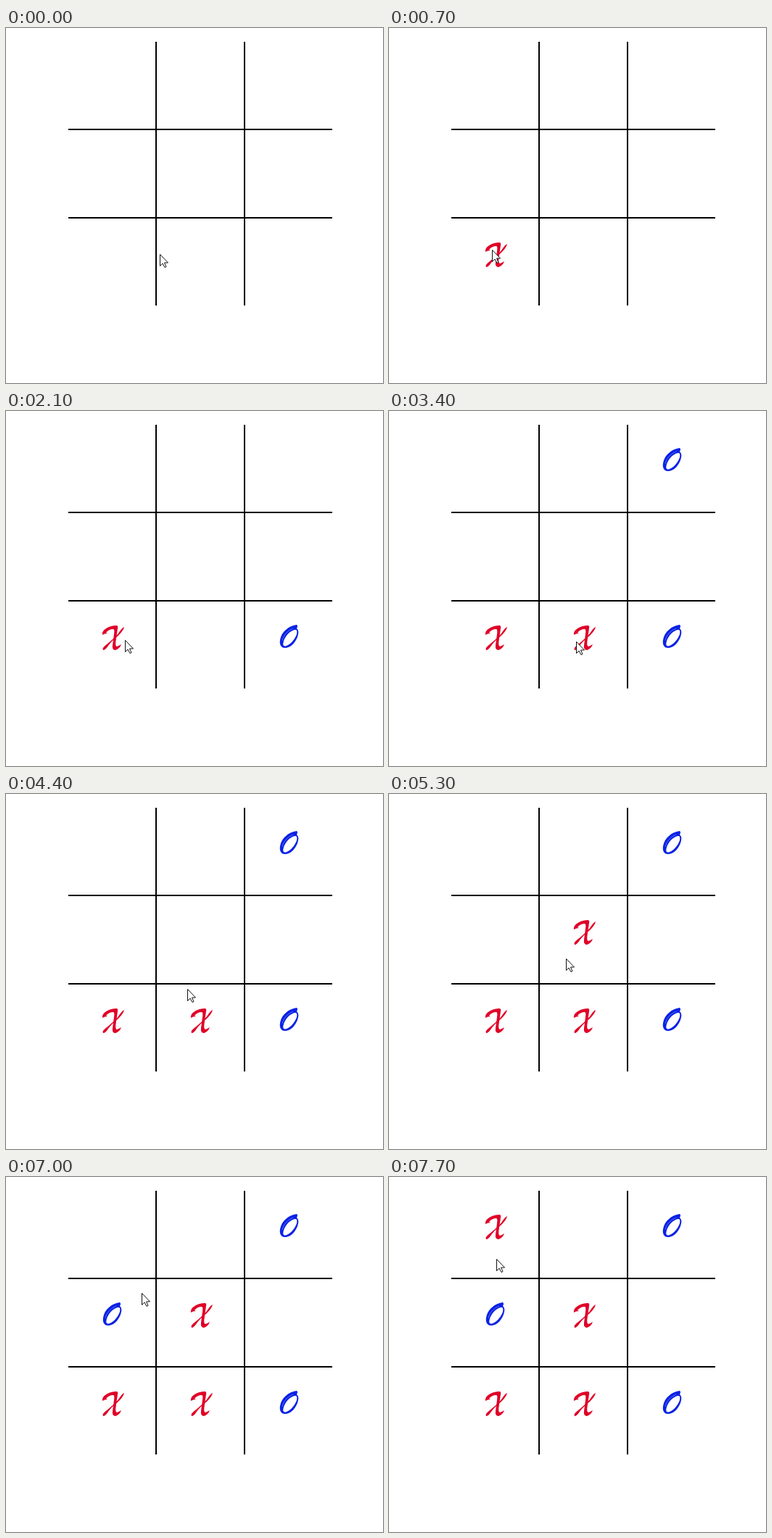
Animation, 520 px wide and 490 px high, one loop 8 s. Source, as an HTML page:

```html
<!DOCTYPE html>
<html lang="en">
<head>
<meta charset="utf-8">
<title>Tic-tac-toe</title>
<style>
  html, body { margin: 0; width: 100%; height: 100%; overflow: hidden; background: #fff; }
  svg { display: block; }
</style>
</head>
<body>
<svg width="520" height="490" viewBox="0 0 520 490">
  <defs>
    <g id="x" fill="#e00028">
      <path d="M1 13C0 7 7 1 20 0Q23 0 22 4L20 18Q18 29 21 29Q24 28 27 26Q25 32 19 34Q14 34 15 27L17 12Q18 5 16 5Q10 5 6 10L8 11Q4 11 1 13Z"/>
      <path d="M31 2Q30 7 23 14Q13 22 9 28Q5 34 2 34Q0 31 7 26Q17 18 23 11Q28 3 31 2Z"/>
    </g>
    <g id="o">
      <path fill="#0a22e4" fill-rule="evenodd" d="M24 1Q26 3 24 6Q28 9 25 18C21 28 14 33 8 33C2 33 0 28 1 22C3 11 12 3 24 1ZM23 8C18 7 10 14 7 21C4 28 5 32 10 30C16 28 22 20 24 14Q25 9 23 8Z"/>
      <path fill="none" stroke="#8c9af6" stroke-width=".6" d="M19 6Q6 12 4 23"/>
    </g>
  </defs>
  <path d="M207 19V383M329 19V383M86 140H450M86 262H450" stroke="#000" stroke-width="2"/>
  <g id="marks"></g>
  <path id="cursor" d="M.5 .5V16.5L4 13L7 18.5L9 17.5L6.5 12H11.5Z" fill="#fff" stroke="#111"/>
</svg>
<script>
const LOOP = 8000, TICK = 100, CELL = 122, REPLY = 500;

// cells in order of play, X and O in turn; O answers each click after REPLY
const cells = [6, 8, 7, 2, 4, 3, 0];
const clicks = [600, 2700, 5300, 7400];

const home = [212, 312];
const moves = [
  { from: 0, to: 300, at: [144, 307] },
  { from: 500, to: 700, at: [142, 306] },
  { from: 1500, to: 1700, at: [147, 310] },
  { from: 1800, to: 2100, at: [164, 316] },
  { from: 2100, to: 2500, at: [258, 318] },
  { from: 3900, to: 4700, at: [244, 227] },
  { from: 6400, to: 7300, at: [148, 113] }
];

const marks = document.getElementById('marks');
const cursor = document.getElementById('cursor');

const pieces = cells.map((cell, i) => {
  const reply = i % 2;
  const el = document.createElementNS('http://www.w3.org/2000/svg', 'use');
  el.setAttribute('href', reply ? '#o' : '#x');
  el.setAttribute('x', 132 + reply + cell % 3 * CELL);
  el.setAttribute('y', 52 - 2 * reply + Math.floor(cell / 3) * CELL);
  marks.append(el);
  return { el, time: clicks[i >> 1] + reply * REPLY };
});

const ease = p => p ** 1.3;

function pointerAt(t) {
  let pos = home;
  for (const { from, to, at } of moves) {
    const p = ease(Math.min(1, Math.max(0, (t - from) / (to - from))));
    pos = pos.map((v, i) => v + (at[i] - v) * p);
  }
  return pos.map(Math.round);
}

function draw(now) {
  const t = Math.floor(now % LOOP / TICK) * TICK;
  for (const { el, time } of pieces) el.style.display = t >= time ? '' : 'none';
  cursor.setAttribute('transform', `translate(${pointerAt(t)})`);
}

const start = performance.now();
function loop() {
  draw(performance.now() - start);
  requestAnimationFrame(loop);
}
loop();
</script>
</body>
</html>
```
